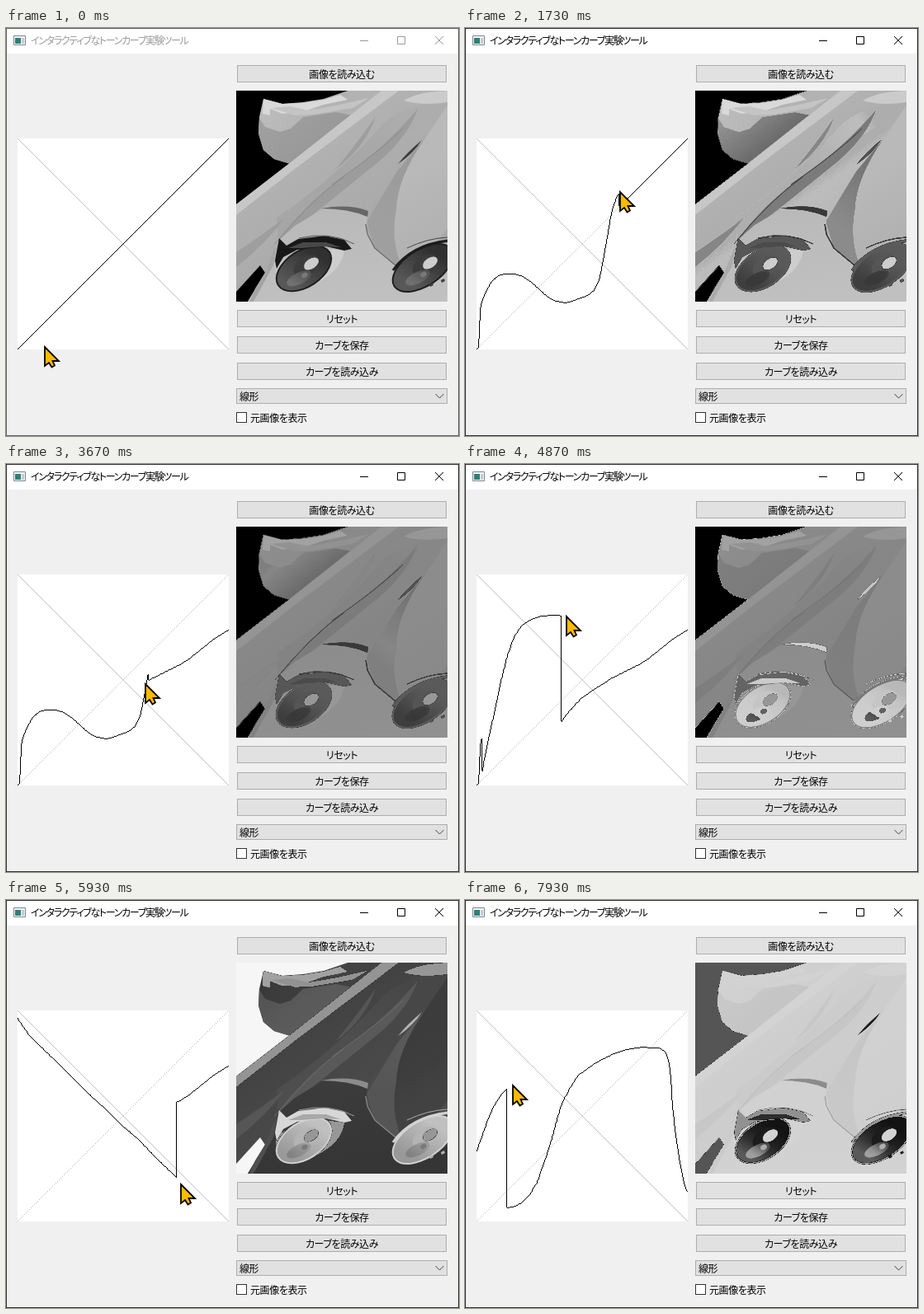
Animation of 549x495 px, one loop 8000 ms. Source, as an HTML page with a canvas:

```html
<!DOCTYPE html>
<html lang="ja">
<head>
<meta charset="utf-8">
<style>
  html, body { margin: 0; width: 100%; height: 100%; overflow: hidden; }
  #win { position: absolute; width: 549px; height: 495px; box-sizing: border-box; background: #f0f0f0;
    font: 12px/20px "Noto Sans CJK JP", "Noto Sans CJK", sans-serif; font-feature-settings: "palt";
    letter-spacing: -.4px; white-space: nowrap; color: #000; }
  #win > * { position: absolute; box-sizing: border-box; }
  #bar { left: 0; top: 0; width: 549px; height: 31px; background: #fff; }
  #title { left: 30px; top: 5px; letter-spacing: -1.3px; }
  #frame { inset: 0; border: 1px solid #303030; }
  .inactive #frame { border-color: #606060; }
  .inactive #title, .inactive #icons { color: #999; }
  .button { left: 280px; width: 254px; height: 21px; line-height: 19px; text-align: center;
    background: #e1e1e1; border: 1px solid #adadad; }
  #combo { left: 279px; top: 437px; width: 256px; height: 19px; line-height: 17px; padding-left: 3px;
    background: #e1e1e1; border: 1px solid #adadad; }
  #check { left: 279px; top: 466px; width: 13px; height: 13px; background: #fff; border: 1px solid #333; }
  canvas, #icons { left: 0; top: 0; }
  #cursor { left: 0; top: 0; overflow: visible; }
</style>
</head>
<body>
<div id="win" class="inactive">
  <div id="bar"></div>
  <div id="title">インタラクティブなトーンカーブ実験ツール</div>
  <div class="button" style="top:45px">画像を読み込む</div>
  <div class="button" style="top:342px">リセット</div>
  <div class="button" style="top:374px">カーブを保存</div>
  <div class="button" style="top:406px">カーブを読み込み</div>
  <div id="combo">線形</div>
  <div id="check"></div>
  <div style="left:296px;top:463px">元画像を表示</div>
  <canvas id="view" width="549" height="495"></canvas>
  <svg id="icons" width="549" height="495" fill="none" stroke="currentColor">
    <path d="M429 15.5h10M474.5 10.5h9v9h-9z"/>
    <path d="M520 10l10 10M530 10l-10 10"/>
    <path d="M520.5 444l5 5 5-5" stroke="#444"/>
    <path d="M9.5 9.5h14v11h-14z" fill="#f4f4f4" stroke="#7d8790"/>
    <path d="M11 12h7v7h-7z" fill="#2f8078" stroke="none"/>
    <path d="M19 12h3v7h-3z" fill="#c4cbd0" stroke="none"/>
  </svg>
  <div id="frame"></div>
  <svg id="cursor" width="20" height="27">
    <path d="M1 1V24L6 20L9.5 25.5L13 23.5L10.5 18H18Z" fill="#ffb900" stroke="#000" stroke-width="1.8"/>
  </svg>
</div>
<script>
const LOOP = 8000, STEP = 1000 / 15, LAG = 28, PRESS = 330;
const PLOT = { x: 14, y: 134 }, PHOTO = { x: 279, y: 76 }, SIZE = 256;
const win = document.getElementById('win');
const cursor = document.getElementById('cursor');
const view = document.getElementById('view').getContext('2d');

// Pen journey: each leg is [end time, path], travelled at constant speed.
const legs = [
  [PRESS, '17,393'],
  [870, '17,386 18,365 19,342 20,334 25,320 33,306 40,300 47,298 60,298'],
  [1715, '70,301 80,308 90,317 100,326 110,331 122,333 135,329 150,323 157,317 163,305 168,280 173,252 177,228 181,212 187,198'],
  [1750, '187,198'],
  [2600, '200,184 225,168 254,152'],
  [2733, '252,161'],
  [2900, '252,161'],
  [3667, '269,201 262,205 250,213 240,221 230,229 220,237 210,243 200,248 190,253 180,258 174,261 168,266'],
  [4350, '160,270 150,277 140,284 130,295 122,304 116,313 80,352 45,390 21,408'],
  [4430, '21,374'],
  [4800, '25,350 32,318 38,290 45,258 52,230 60,208 70,194 80,188 92,184 108,183'],
  [4867, '122,184'],
  [5400, '165,190 90,150 14,143'],
  [5450, '14,143'],
  [5900, '20,153 28,164 40,176 60,195 80,215 100,235 120,253 140,273 160,290 180,311 206,336'],
  [5933, '211,344'],
  [6220, '226,353 269,398 274,403'],
  [6480, '274,403'],
  [7067, '269,354 265,342 260,318 255,285 251,250 249,215 247,198 244,187 240,182 235,179 226,179 214,178'],
  [7333, '195,181 180,186 160,196 145,206 136,213 128,226 118,245 112,262 104,292'],
  [7660, '100,305 93,325 87,342 78,357 68,367 58,372 50,373 14,375'],
  [7720, '14,305'],
  [7900, '20,288 28,265 36,247 44,235 50,229'],
  [7933, '57,224'],
  [LOOP, '68,215']
];

const knots = [{ t: 0, x: 46, y: 386 }];
for (const [end, path] of legs) {
  const start = knots[knots.length - 1];
  let prev = start, length = 0;
  const points = path.split(' ').map(pair => {
    const [x, y] = pair.split(',').map(Number);
    length += Math.hypot(x - prev.x, y - prev.y);
    return prev = { x, y, length };
  });
  for (const p of points)
    knots.push({ t: start.t + (end - start.t) * (length ? p.length / length : 1), x: p.x, y: p.y });
}

function penAt(t) {
  const i = Math.max(1, knots.findIndex(k => k.t >= t));
  const a = knots[i - 1], b = knots[i], f = (t - a.t) / (b.t - a.t || 1);
  return { x: a.x + (b.x - a.x) * f, y: a.y + (b.y - a.y) * f };
}

// Tone table: identity, overwritten column by column along the pen's path.
function toneAt(time) {
  const tone = Array.from({ length: SIZE }, (_, i) => i);
  let last = penAt(PRESS);
  for (let t = PRESS; t <= time; t += 4) {
    const pen = penAt(t);
    const from = Math.round(last.x), to = Math.round(pen.x), dir = Math.sign(to - from) || 1;
    for (let x = from; x !== to + dir; x += dir) {
      const column = x - PLOT.x;
      if (column < 0 || column >= SIZE) continue;
      const y = from === to ? pen.y : last.y + (pen.y - last.y) * (x - from) / (to - from);
      tone[column] = Math.max(0, Math.min(255, Math.round(PLOT.y + 255 - y)));
    }
    last = pen;
  }
  return tone;
}

// Grey illustration, painted once and remapped through the tone table.
function paintPhoto() {
  const canvas = document.createElement('canvas');
  canvas.width = canvas.height = SIZE;
  const g = canvas.getContext('2d', { willReadFrequently: true });
  const grey = v => `rgb(${v},${v},${v})`;
  const ramp = (x0, y0, v0, x1, y1, v1) => {
    const r = g.createLinearGradient(x0, y0, x1, y1);
    r.addColorStop(0, grey(v0));
    r.addColorStop(1, grey(v1));
    return r;
  };
  const fill = (tint, d) => {
    g.fillStyle = typeof tint === 'number' ? grey(tint) : tint;
    g.fill(new Path2D(d));
  };
  const line = (v, width, d) => {
    g.strokeStyle = grey(v);
    g.lineWidth = width;
    g.stroke(new Path2D(d));
  };
  const oval = (tint, x, y, rx, ry, angle) => {
    g.fillStyle = typeof tint === 'number' ? grey(tint) : tint;
    g.beginPath();
    g.ellipse(x, y, rx, ry, angle, 0, 7);
    g.fill();
  };
  const eye = (x, y, rx, ry) => {
    oval(30, x, y, rx, ry, -.58);
    oval(ramp(x + 12, y - 20, 48, x - 14, y + 22, 88), x, y, rx - 2, ry - 2, -.58);
    oval(60, x + 3, y - 3, 17, 11, -.6);
    oval(ramp(x, y + 4, 84, x - 10, y + 20, 112), x - 6, y + 12, 16, 7, -.45);
    oval(205, x + 9, y - 6, 10, 6, -.6);
    oval(120, x + 1, y + 8, 4, 3, -.5);
  };
  g.fillRect(0, 0, SIZE, SIZE);
  g.translate(-PHOTO.x, -PHOTO.y);

  // Tuft
  fill(ramp(320, 90, 188, 380, 130, 178), 'M312 86L335 92 360 90 385 86 420 74H470L345 165 325 159 312 148 306 128 307 108Z');
  fill(ramp(315, 115, 160, 350, 160, 153), 'M307 109L314 120 332 126 345 122 360 108 400 102 420 106 345 165 325 159 312 148 306 128Z');
  fill(217, 'M312 86L335 92 360 91 385 87 405 81 414 87 385 93 362 101 335 104 320 98 320 106 311 104Z');
  fill(196, 'M322 97L345 95 366 100 400 94 440 85 420 97 372 105 350 106Z');

  // Hair
  fill(ramp(330, 130, 181, 430, 270, 167), 'M279 214L345 163 455 76H535V332H279Z');
  fill(199, 'M279 214L345 163 455 76H476L350 171 279 227Z');
  fill(ramp(400, 150, 166, 480, 90, 173), 'M328 230Q400 182 458 115Q492 89 535 91V104Q470 130 430 168Q380 212 330 258Z');
  fill(203, 'M482 88Q500 77 535 76V90Q505 95 482 88Z');
  fill(156, 'M326 262Q365 210 410 180Q462 142 499 98Q487 132 452 162Q390 213 326 262Z');
  fill(158, 'M399 172Q433 130 448 107Q436 144 399 172Z');
  fill(158, 'M279 272Q318 246 338 230Q315 262 279 290Z');
  line(138, 1, 'M326 262Q370 208 410 180M395 190Q455 148 481 122');

  // Right lock
  fill(ramp(440, 230, 159, 500, 150, 154), 'M437 235Q455 205 474 174L505 137 535 99V240L494 290 471 286 447 267Z');
  fill(ramp(485, 180, 185, 525, 245, 178), 'M535 94L507 135Q474 183 473 220Q466 257 479 288L494 290 535 244Z');
  fill(60, 'M475 165Q486 151 504 136Q494 152 475 165Z');

  // Face
  fill(0, 'M279 320L308 288 314 297 293 332H279Z');
  fill(ramp(385, 220, 185, 400, 330, 192), 'M329 259L350 240 385 219 438 222 437 245 447 266 471 286 494 290 535 271V332H293L314 297Z');
  fill(165, 'M329 259L314 297 302 316 295 332H300L324 288Z');
  fill(102, 'M382 219Q415 213 439 222L438 229Q415 219 382 219Z');
  line(112, 1.5, 'M436 238L438 250 447 267 471 287 494 290');

  // Eyes
  fill(205, 'M327 290Q350 262 410 270Q405 304 350 319Q328 316 327 290Z');
  eye(361, 292, 38, 23);
  fill(24, 'M326 282L331 255 340 264 354 256 386 252 410 257 419 268 410 270 388 265 353 269 336 278 328 292Z');
  fill(72, 'M342 267L360 260 388 260 406 266 385 265 358 267Z');
  line(85, 1, 'M355 255Q392 246 422 262');
  eye(505, 291, 42, 23);
  line(28, 3, 'M469 294Q491 263 536 258');
  line(70, 1, 'M486 267Q511 255 535 254');
  fill(60, 'M513 311l4-2 1 3-4 2zM527 306l4-2 1 3-4 2z');

  return g.getImageData(0, 0, SIZE, SIZE);
}

const photo = paintPhoto();
const mapped = view.createImageData(SIZE, SIZE);

function drawPlot(tone) {
  view.fillStyle = '#fff';
  view.fillRect(PLOT.x, PLOT.y, SIZE, SIZE);
  view.fillStyle = '#c0c0c0';
  for (let i = 0; i < SIZE; i++) {
    view.fillRect(PLOT.x + i, PLOT.y + i, 1, 1);
    if (i % 2 === 0) view.fillRect(PLOT.x + i, PLOT.y + 255 - i, 1, 1);
  }
  view.fillStyle = '#000';
  tone.forEach((v, i) => {
    const next = tone[i + 1] ?? v;
    const height = Math.max(1, Math.abs(next - v));
    const top = next > v ? v + height - 1 : v;
    view.fillRect(PLOT.x + i, PLOT.y + 255 - top, 1, height);
  });
}

function drawPhoto(tone) {
  for (let i = 0; i < photo.data.length; i += 4) {
    mapped.data.fill(tone[photo.data[i]], i, i + 3);
    mapped.data[i + 3] = 255;
  }
  view.putImageData(mapped, PHOTO.x, PHOTO.y);
}

let shown = -1;
function render(now) {
  const step = Math.floor((now % LOOP + 3.4) / STEP) % 120;
  if (step !== shown) {
    shown = step;
    const t = step * STEP, tone = toneAt(t - LAG), pen = penAt(t);
    win.classList.toggle('inactive', t < PRESS);
    drawPlot(tone);
    drawPhoto(tone);
    cursor.style.transform = `translate(${Math.round(pen.x)}px, ${Math.round(pen.y)}px)`;
  }
  requestAnimationFrame(render);
}
const begin = performance.now();
const tick = () => render(Math.max(0, performance.now() - begin));
render(0);
</script>
</body>
</html>
```
